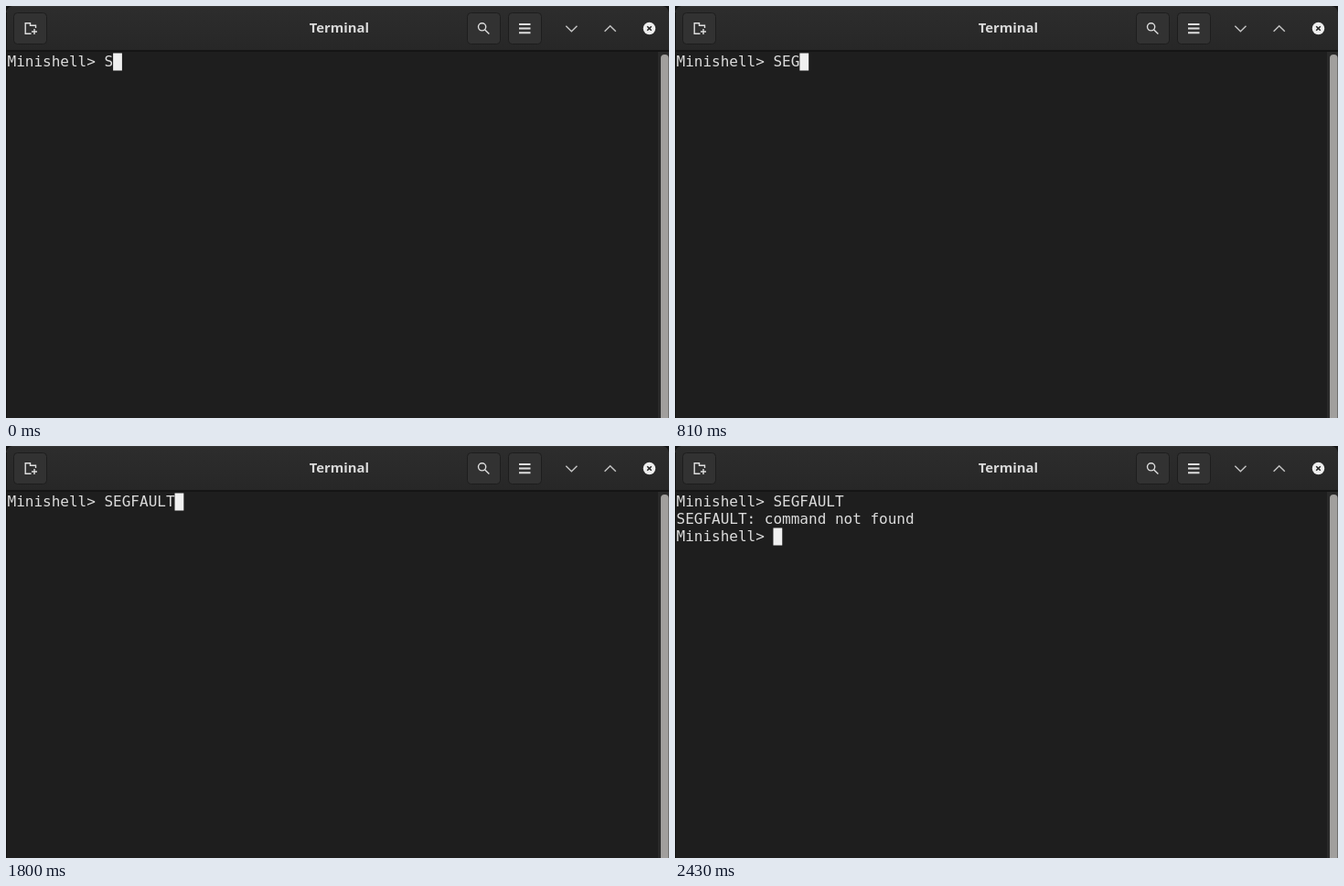
Recreate the animation shown at these times as an HTML page. Size 725 by 450 pixels, loop 2460 ms.

```html
<!DOCTYPE html>
<html lang="en">
<head>
<meta charset="utf-8">
<title>Terminal</title>
<style>
  html, body { margin: 0; width: 100%; height: 100%; overflow: hidden; background: #1e1e1e; }
  svg { display: block; }
  .shell { font: 16px "DejaVu Sans Mono", monospace; fill: #dcdcdc; white-space: pre; }
  .title { font: bold 14.8px "Open Sans", "Noto Sans", sans-serif; fill: #dadada; text-anchor: middle; }
  .button rect { fill: #323232; stroke: #1d1d1d; }
  .icon { fill: none; stroke: #dedede; stroke-width: 1.4; }
</style>
</head>
<body>
<svg width="725" height="450" viewBox="0 0 725 450">
  <defs>
    <linearGradient id="bar" x2="0" y2="1">
      <stop stop-color="#2d2d2d"/>
      <stop offset="1" stop-color="#272727"/>
    </linearGradient>
  </defs>
  <rect width="725" height="450" fill="#1e1e1e"/>
  <rect width="725" height="49" fill="url(#bar)"/>
  <path d="M0 .5H725" stroke="#353535"/>
  <path d="M0 0H7Q1 1 0 7ZM725 0H718Q724 1 725 7Z" fill="#151515"/>
  <path d="M0 49H725" stroke="#101010" stroke-width="1.6"/>
  <path d="M.5 7V450" stroke="#111"/>

  <g class="button">
    <rect x="8.5" y="7.5" width="36" height="34" rx="4"/>
    <rect x="504.5" y="7.5" width="36" height="34" rx="4"/>
    <rect x="549.5" y="7.5" width="36" height="34" rx="4"/>
  </g>
  <g class="icon">
    <path d="M27.5 30.3H21.2V18.8H26.5V21.3H32.5V24M31 25V31M28 28H34"/>
    <circle cx="520.6" cy="22.8" r="4.1"/>
    <path d="M523.7 25.9L528.4 30.4"/>
    <path d="M561 20H573.5M561 24.6H573.5M561 29.2H573.5" stroke-width="2"/>
    <path d="M612.3 21.7L618.4 27.8L624.5 21.7M654.6 27.8L660.7 21.7L666.8 27.8" stroke="#c4c4c4"/>
  </g>
  <circle cx="703.5" cy="24.5" r="6.7" fill="#efefef"/>
  <path d="M701.2 22.2L705.8 26.8M705.8 22.2L701.2 26.8" stroke="#292929" stroke-width="1.6"/>
  <text class="title" x="364.3" y="29.4">Terminal</text>

  <rect x="713" y="50" width="12" height="400" fill="#2a2a2a"/>
  <path d="M716 450V57Q716 53 720.3 53T724.6 57V450Z" fill="#a19f9d"/>

  <g class="shell">
    <text class="line" x="1.5" y="66"></text>
    <text class="line" x="1.5" y="85"></text>
    <text class="line" x="1.5" y="104"></text>
  </g>
  <rect id="cursor" width="9.8" height="19" fill="#f0f0f0"/>
</svg>
<script>
  const LOOP = 2460, ENTER = 2070, ADVANCE = 9.633, LINE = 19;
  const PROMPT = "Minishell> ", COMMAND = "SEGFAULT";
  const keyTimes = [0, 330, 690, 960, 1170, 1320, 1440, 1650];
  const lines = document.querySelectorAll(".line");
  const cursor = document.getElementById("cursor");

  function draw(now) {
    const t = now % LOOP;
    const typed = PROMPT + COMMAND.slice(0, keyTimes.filter(k => k <= t).length);
    const output = t < ENTER ? [typed] : [typed, COMMAND + ": command not found", PROMPT];
    const last = output.length - 1;
    lines.forEach((line, i) => line.textContent = output[i] || "");
    cursor.setAttribute("x", 1.5 + output[last].length * ADVANCE);
    cursor.setAttribute("y", 51.5 + last * LINE);
    requestAnimationFrame(draw);
  }
  draw(performance.now());
</script>
</body>
</html>
```
